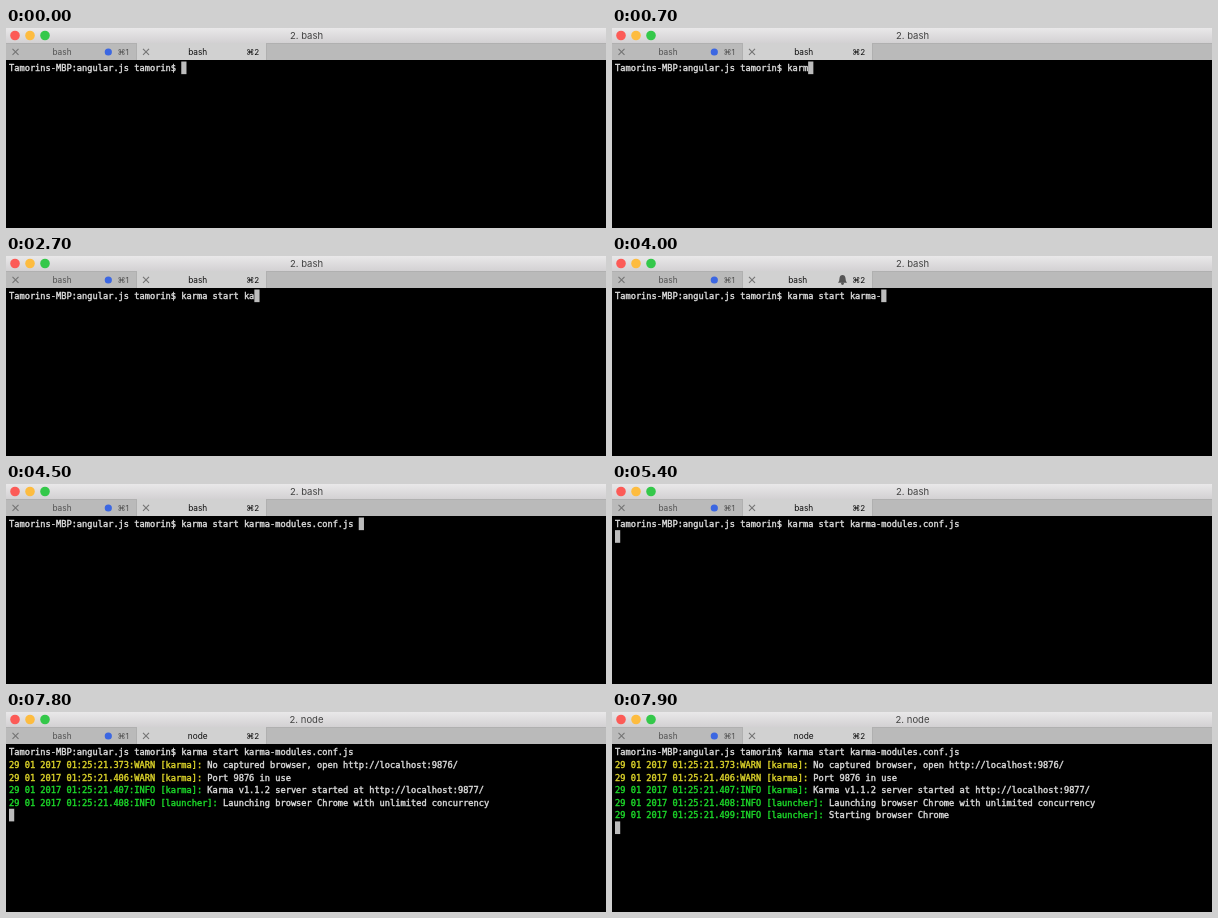
Recreate the animation shown at these times as an HTML page with a canvas. Size 600 px wide and 200 px high, loop 8000 ms.

```html
<!DOCTYPE html>
<html lang="en">
<head>
<meta charset="utf-8">
<title>Terminal</title>
<style>
  html, body { margin: 0; width: 600px; height: 200px; overflow: hidden; background: #000; }
  canvas { display: block; width: 600px; height: 200px; }
</style>
</head>
<body>
<canvas id="stage" width="600" height="200"></canvas>
<script>
const ctx = document.getElementById('stage').getContext('2d');
const LOOP = 8000;
const UI = 'Inter, "Open Sans", sans-serif';
const MONO = '8.67px "DejaVu Sans Mono", monospace';
const CELL = { left: 3, top: 33.5, width: 5.22, height: 12.65 };
const WHITE = '#dadada', YELLOW = '#dcd32a', GREEN = '#1cd829';

const PROMPT = 'Tamorins-MBP:angular.js tamorin$ ';
const COMMAND = 'karma start karma-modules.conf.js ';

// [time, characters of the command visible from then on]
const TYPING = [
  [200, 1], [300, 2], [500, 3], [700, 4], [800, 5], [900, 6], [1000, 7], [1100, 8],
  [1300, 9], [1500, 10], [1700, 11], [1800, 12], [2500, 13], [2700, 14],
  [2900, 15], [3000, 16], [3100, 17], [3200, 18],
  [4300, 19], [4400, 20], [4500, COMMAND.length]
];
const ENTER = 5400, JOB_START = 6200;
const BELL = [3200, 4300];

// [time, clock fraction, level, logger, message]
const LOG = [
  [7800, '373', 'WARN', 'karma', 'No captured browser, open http://localhost:9876/'],
  [7800, '406', 'WARN', 'karma', 'Port 9876 in use'],
  [7800, '407', 'INFO', 'karma', 'Karma v1.1.2 server started at http://localhost:9877/'],
  [7800, '408', 'INFO', 'launcher', 'Launching browser Chrome with unlimited concurrency'],
  [7900, '499', 'INFO', 'launcher', 'Starting browser Chrome']
];

function rect(x, y, w, h, color) {
  ctx.fillStyle = color;
  ctx.fillRect(x, y, w, h);
}

function disc(x, y, r, color) {
  ctx.beginPath();
  ctx.arc(x, y, r, 0, 2 * Math.PI);
  ctx.fillStyle = color;
  ctx.fill();
}

function label(text, x, y, size, color, weight = 400) {
  ctx.font = `${weight} ${size}px ${UI}`;
  ctx.textAlign = 'center';
  ctx.fillStyle = color;
  ctx.fillText(text, x, y);
}

function closeMark(x, y) {
  ctx.strokeStyle = '#747474';
  ctx.lineWidth = 1.1;
  ctx.beginPath();
  ctx.moveTo(x - 3, y - 3); ctx.lineTo(x + 3, y + 3);
  ctx.moveTo(x + 3, y - 3); ctx.lineTo(x - 3, y + 3);
  ctx.stroke();
}

function bell(x, y) {
  const color = '#555';
  ctx.fillStyle = color;
  ctx.beginPath();
  ctx.moveTo(x - 4.5, y + 3);
  ctx.quadraticCurveTo(x - 3, y + 1.5, x - 3, y - 1.5);
  ctx.bezierCurveTo(x - 3, y - 6, x + 3, y - 6, x + 3, y - 1.5);
  ctx.quadraticCurveTo(x + 3, y + 1.5, x + 4.5, y + 3);
  ctx.fill();
  disc(x, y + 3.8, 1.4, color);
}

function drawTitleBar(job) {
  const shade = ctx.createLinearGradient(0, 0, 0, 15);
  shade.addColorStop(0, '#e9e8e9');
  shade.addColorStop(1, '#d3d1d3');
  rect(0, 0, 600, 16, shade);
  disc(9, 7.5, 4.8, '#fc5b57');
  disc(24, 7.5, 4.8, '#fdbc40');
  disc(39, 7.5, 4.8, '#34c84a');
  label('2. ' + job, 300.5, 11, 9.5, '#424242');
}

function drawTabs(job, ringing) {
  rect(0, 15, 600, 17, '#bababa');
  rect(0, 15, 600, 1, '#b0b0b0');
  rect(130, 15, 131, 17, '#b0b0b0');
  rect(131, 15, 129, 17, '#d1d1d1');
  closeMark(9.5, 23.8);
  closeMark(140, 23.8);
  label('bash', 56, 27, 8.3, '#505050');
  disc(102.3, 24, 3.6, '#3c67e2');
  label('⌘1', 117.2, 27, 8.1, '#505050');
  // The bell takes room on the right, so the centred label moves left.
  label(job, ringing ? 185.7 : 191.7, 27, 8.3, '#0c0c0c');
  label('⌘2', 246.7, 27, 8.1, '#0c0c0c');
  if (ringing) bell(230.5, 23.8);
}

function print(text, col, row, color) {
  ctx.font = MONO;
  ctx.textAlign = 'left';
  ctx.fillStyle = ctx.strokeStyle = color;
  ctx.lineWidth = 0.4;
  const y = 43.2 + row * CELL.height;
  [...text].forEach((char, i) => {
    const x = CELL.left + (col + i) * CELL.width;
    ctx.fillText(char, x, y);
    ctx.strokeText(char, x, y);
  });
}

function cursor(col, row) {
  rect(CELL.left + col * CELL.width, CELL.top + row * CELL.height, CELL.width, CELL.height, '#bcbcbc');
}

function drawTerminal(t) {
  rect(0, 32, 600, 168, '#000');
  const typed = TYPING.reduce((n, [at, count]) => t >= at ? count : n, 0);
  const line = PROMPT + COMMAND.slice(0, typed);
  print(line, 0, 0, WHITE);
  if (t < ENTER) return cursor(line.length, 0);

  const shown = LOG.filter(([at]) => t >= at);
  shown.forEach(([, fraction, level, logger, message], i) => {
    const head = `29 01 2017 01:25:21.${fraction}:${level} [${logger}]: `;
    print(head, 0, i + 1, level === 'WARN' ? YELLOW : GREEN);
    print(message, head.length, i + 1, WHITE);
  });
  cursor(0, shown.length + 1);
}

function draw(t) {
  const job = t < JOB_START ? 'bash' : 'node';
  drawTitleBar(job);
  drawTabs(job, t >= BELL[0] && t < BELL[1]);
  drawTerminal(t);
}

const start = performance.now();
function frame() {
  draw((performance.now() - start) % LOOP);
  requestAnimationFrame(frame);
}
frame();
</script>
</body>
</html>
```
